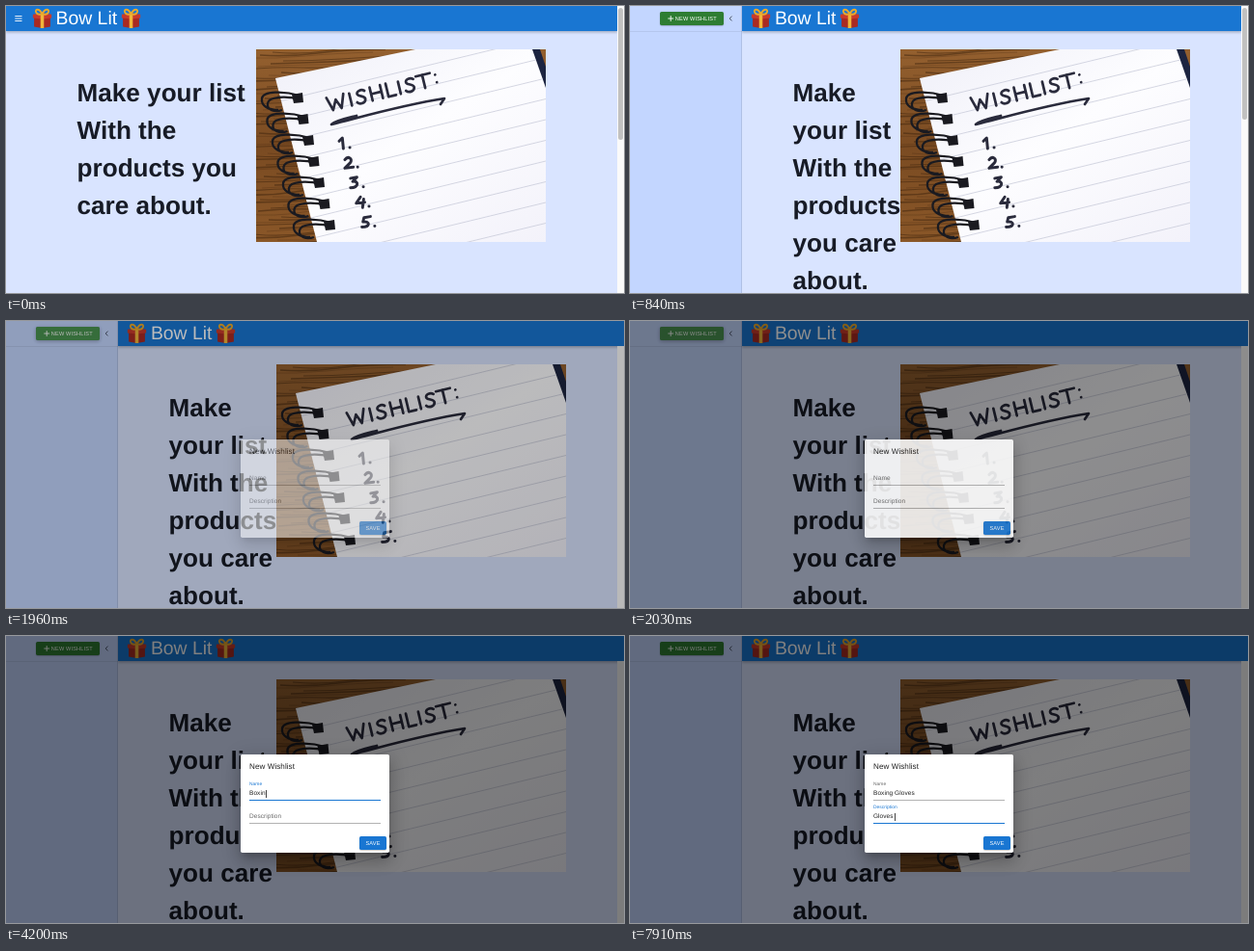
An HTML page for the animation above (8 s loop, 640x298 px).

```html
<!DOCTYPE html>
<html lang="en">
<head>
<meta charset="utf-8">
<title>Wishlist</title>
<style>
html, body { margin: 0; width: 100%; height: 100%; overflow: hidden; }
body { position: relative; background: #fff; font-family: "Liberation Sans", Arial, sans-serif; text-rendering: geometricPrecision; }
div, svg, label, button { position: absolute; box-sizing: border-box; }
#stage { width: 640px; height: 298px; overflow: hidden; background: #d9e4ff; }
#heading { top: 71px; font: bold 26.1px/39px "Liberation Sans", Arial, sans-serif; color: #171b26; }
#photo { top: 44.5px; width: 300px; height: 200px; }
#bar { top: 0; height: 26px; background: #1976d2;
  box-shadow: 0 .8px 1.6px -.4px rgba(0,0,0,.2), 0 1.6px 2px rgba(0,0,0,.14), 0 .4px 4px rgba(0,0,0,.12); }
#brand { top: 0; height: 26px; width: 120px; color: #fff; font-size: 19.4px; line-height: 26px; white-space: pre; }
#brand span { position: absolute; left: 24px; }
#brand svg { top: 2px; left: -.5px; width: 21px; height: 21px; }
#menu { left: 0; top: 0; width: 26px; height: 26px; }
#track { left: 633px; width: 7px; height: 298px; background: #fafafa; }
#thumb { left: 1px; top: 2px; width: 5px; border-radius: 3px; background: #c1c1c1; }
#drawer { width: 116.4px; height: 298px; background: #c3d6ff; border-right: .5px solid rgba(0,0,0,.1); }
#drawer hr { position: absolute; margin: 0; top: 26px; width: 116px; border: 0; border-top: 1px solid rgba(0,0,0,.07); }
button { border: 0; padding: 0; color: #fff; border-radius: 1.7px; font: 5.6px/14px "Liberation Sans", Arial, sans-serif; letter-spacing: .16px;
  box-shadow: 0 .8px .8px rgba(0,0,0,.16), 0 .4px 2px rgba(0,0,0,.14); overflow: hidden; }
#add { left: 31px; top: 5.5px; width: 66px; height: 14.6px; background: #2e7d32; text-align: left; }
#add span { position: absolute; left: 15.8px; top: .3px; white-space: pre; }
#add svg { left: 0; top: .3px; width: 66px; height: 14px; overflow: visible; }
#shade { inset: 0; background: rgba(0,0,0,.5); }
#dialog { left: 243px; top: 123px; width: 154px; height: 102px; background: #fff; border-radius: 1.7px;
  box-shadow: 0 4.5px 6px -3px rgba(0,0,0,.2), 0 9.7px 15.4px 1.2px rgba(0,0,0,.14), 0 3.6px 18.7px 3.2px rgba(0,0,0,.12); }
#dialog h2 { position: absolute; left: 9px; top: 7px; margin: 0; font-size: 8.1px; line-height: 11px; font-weight: 400; letter-spacing: .06px; color: rgba(0,0,0,.87); }
#save { left: 123px; top: 85px; width: 28px; height: 14px; background: #1976d2; }
.field { left: 9px; width: 136px; height: 12px; font-size: 6.5px; line-height: 10px; letter-spacing: .06px; }
.field label { left: 0; top: 0; transform-origin: 0 50%; }
.field .text { white-space: pre; color: rgba(0,0,0,.87); }
.caret { position: absolute; right: -.8px; top: 1px; width: .8px; height: 8px; background: #444; }
.rule, .focus { left: 0; top: 11px; width: 136px; height: 1px; background: rgba(0,0,0,.3); }
.focus { background: #1976d2; }
</style>
</head>
<body>
<div id="stage">
  <div id="heading">Make your list With the products you care about.</div>
  <svg id="photo" viewBox="0 0 300 200">
    <defs>
      <linearGradient id="wood" x2="0" y2="1"><stop stop-color="#94602f"/><stop offset=".5" stop-color="#7a4b22"/><stop offset="1" stop-color="#8a5728"/></linearGradient>
      <linearGradient id="paper" x2="1" y2="1"><stop stop-color="#efeff8"/><stop offset=".5" stop-color="#fdfdff"/><stop offset="1" stop-color="#f3f2fa"/></linearGradient>
      <clipPath id="sheet"><path d="M20 30L165 0H286L300 40V200H63Z"/></clipPath>
    </defs>
    <path fill="url(#wood)" d="M0 0H300V200H0Z"/>
    <g id="grain" fill="none" stroke="#3d220d" stroke-opacity=".5"/>
    <path fill="#1c2440" d="M284 0H294L300 18V42Z"/>
    <g clip-path="url(#sheet)">
      <path fill="url(#paper)" d="M0 0H300V200H0Z"/>
      <g id="lines" stroke="#c3c6d6" stroke-width=".7"/>
    </g>
    <g id="rings" fill="none" stroke="#1a1a20" stroke-width="2.3"/>
    <g fill="none" stroke="#2a2b3c" stroke-width="2.7" stroke-linecap="round" stroke-linejoin="round">
      <g transform="translate(76 64) rotate(-13.5)">
        <path d="M0-14L4 0L9-10L13 0L18-14M24-13v13M46-14v14M57-14v14M46-7h11M63-14v14h8M76-13v13M95-14h15M102-14v14M115-11h.1M115-3h.1"/>
        <path id="ess" d="M40-12c-3-3-9-1-8 2s8 3 7 7s-7 4-9 1"/>
        <use href="#ess" x="52"/>
      </g>
      <path d="M104 69C92 72 82 74 78 78C110 70 150 58 195 51L191 57"/>
      <g id="digits"/>
    </g>
  </svg>
  <div id="bar">
    <svg id="menu" viewBox="0 0 26 26"><circle id="tap" cx="13" cy="13" fill="#fff"/><path stroke="#fff" stroke-width=".9" d="M9.3 10.5h7.2M9.3 13h7.2M9.3 15.5h7.2"/></svg>
    <div id="brand"><svg id="gift" viewBox="0 0 20 20">
      <path fill="#a92a22" d="M2 9H18V18.5L10 20L2 18.5Z"/><path fill="#c93a2b" d="M.8 6.5L10 5L19.2 6.5V10L10 11L.8 10Z"/>
      <path fill="#f0b63a" d="M8.3 5.5h3.4V20H8.3Z"/><path fill="none" stroke="#e9a92c" stroke-width="1.8" d="M10 6C7 0 2.5 1 4 4.5S8 6 10 6C13 0 17.5 1 16 4.5S12 6 10 6Z"/>
    </svg><span>Bow Lit</span></div>
  </div>
  <div id="track"><div id="thumb"></div></div>
  <div id="drawer">
    <hr>
    <button id="add"><svg viewBox="0 0 66 14"><circle id="ripple" cx="46" cy="8" fill="#8fe09a"/><path stroke="#fff" stroke-width=".9" d="M8.3 7h5.8M11.2 4.1v5.8"/></svg><span>NEW WISHLIST</span></button>
    <svg style="left:100px;top:8px" width="10" height="10"><path fill="none" stroke="#4c556b" d="M5.5 2.6L3.2 5L5.5 7.4"/></svg>
  </div>
  <div id="shade"></div>
  <div id="dialog">
    <h2>New Wishlist</h2>
    <div class="field" style="top:36px"></div>
    <div class="field" style="top:60px"></div>
    <button id="save">SAVE</button>
  </div>
</div>
<script>
const $ = id => document.getElementById(id);
const LOOP = 8000, STEP = 70;

const clamp = v => Math.min(1, Math.max(0, v));
const lerp = (a, b, p) => a + (b - a) * p;
const span = (t, from, length) => clamp((t - from) / length);

// Deceleration curve: cubic-bezier(0, 0, .2, 1)
function easeOut(u) {
  let lo = 0, hi = 1;
  for (let i = 0; i < 20; i++) {
    const s = (lo + hi) / 2;
    if (.6 * (1 - s) * s * s + s * s * s < u) lo = s; else hi = s;
  }
  return 3 * lo * lo - 2 * lo * lo * lo;
}

function track(keys, t) {
  const i = keys.findIndex(k => k[0] > t);
  if (i === 0) return keys[0][1];
  if (i < 0) return keys[keys.length - 1][1];
  const [a, b] = [keys[i - 1], keys[i]];
  return lerp(a[1], b[1], (t - a[0]) / (b[0] - a[0]));
}

function drawPhoto() {
  let grain = '', lines = '', rings = '', digits = '';
  for (let i = 0; i < 70; i++) {
    const y = i * 3, x = (i * 37) % 50 - 20, bend = (i * 13) % 7 - 3;
    grain += `<path stroke-width="${.5 + i % 3 * .6}" d="M${x} ${y}q30 ${bend} 60 -2t70 -4"/>`;
  }
  for (let i = 0; i < 12; i++) {
    const y = 55 + i * 21.5;
    lines += `<path d="M20 ${y}L300 ${y - 68}"/>`;
  }
  for (let i = 0; i < 7; i++) {
    rings += `<g transform="translate(${49 + i * 5.5} ${51 + i * 22})">
      <path d="M-4-3C-20-8-42-8-43 0S-36 12-26 12M-4 1C-18-3-36-2-37 5S-30 15-22 12"/>
      <path fill="#1a1a20" stroke="none" d="M-12-4L-1-6L0 4L-10 5Z"/></g>`;
  }
  ['M0-7l3-3l1 10', 'M0-8c3-4 8-1 5 3l-5 5l8-1', 'M0-9l6-1l-4 4c6-1 6 6-2 6',
   'M4-10l-4 6l8-1M7-8l-1 8', 'M8-10l-6 1l-1 4c7-1 7 5-1 5'].forEach((d, i) => {
    digits += `<path transform="translate(${86 + i * 5.9} ${103 + i * 20.4}) scale(1.1)" d="${d}M${i ? 12 : 10}-1h.1"/>`;
  });
  $('grain').innerHTML = grain;
  $('lines').innerHTML = lines;
  $('rings').innerHTML = rings;
  $('digits').innerHTML = digits;
}

const gift = $('gift').cloneNode(true);
gift.removeAttribute('id');
gift.style.left = '91.5px';
$('brand').append(gift);
drawPhoto();

function makeField(el, name, value, times, focusAt, blurAt) {
  el.innerHTML = `<label>${name}</label><div class="text"><span></span><i class="caret"></i></div>
    <div class="rule"></div><div class="focus"></div>`;
  const [label, text, , line] = el.children;
  const [typed, caret] = text.children;
  return t => {
    const on = easeOut(span(t, focusAt, 200)), off = easeOut(span(t, blurAt, 200));
    const focused = t >= focusAt && t < blurAt;
    const blink = t >= 6580 && t < 7140;
    label.style.transform = `translateY(${-9.5 * on}px) scale(${1 - .25 * on})`;
    label.style.color = focused ? '#1976d2' : 'rgba(0,0,0,.6)';
    line.style.transform = `scaleX(${on - off})`;
    typed.textContent = value.slice(0, times.filter(at => at <= t).length);
    caret.style.display = focused && !blink ? '' : 'none';
  };
}

const [nameBox, infoBox] = document.querySelectorAll('.field');
const fields = [
  makeField(nameBox, 'Name', 'Boxing Gloves',
    [3570, 3640, 3710, 4060, 4130, 4270, 4410, 4620, 4760, 4970, 5180, 5250, 5670], 2895, 6042),
  makeField(infoBox, 'Description', 'Gloves ', [7140, 7350, 7490, 7630, 7630, 7770, 7910], 6042, LOOP)
];

const OPEN = 350;
const FADE = [[1610, 0], [1750, .05], [1890, .22], [1960, .52], [2030, .88], [2170, 1]];

function render(t) {
  const open = t >= OPEN, p = easeOut(span(t, OPEN, 420));
  const textX = lerp(73.6, 168.6, p), photoX = lerp(259, 280, p), edge = 116.4 * p;
  const fade = track(FADE, t), modal = fade > 0;

  $('heading').style.left = textX + 'px';
  $('heading').style.width = photoX - textX + 1 + 'px';
  $('photo').style.left = photoX + 'px';
  $('drawer').style.transform = `translateX(${117 * (p - 1)}px)`;
  $('bar').style.left = edge + 'px';
  $('bar').style.width = (modal ? 640 : 633) - edge + 'px';
  $('brand').style.left = (open ? 9.5 : 27.5) + 'px';
  $('menu').style.display = open ? 'none' : '';
  $('thumb').style.display = modal ? 'none' : '';
  $('thumb').style.height = lerp(137, 116, p) + 'px';
  $('track').style.top = modal ? '26px' : 0;

  const tap = span(t, 0, 280);
  $('tap').setAttribute('r', 9 * tap);
  $('tap').setAttribute('opacity', .22 * Math.min(1, tap * 4));

  const hover = span(t, 840, 280) * (1 - span(t, 2170, 280));
  const lift = 1 + hover;
  $('add').style.background = `rgb(${lerp(46, 27, hover)},${lerp(125, 94, hover)},${lerp(50, 32, hover)})`;
  $('add').style.boxShadow = `0 ${.8 * lift}px ${.8 + 3 * hover}px rgba(0,0,0,.16), 0 .4px ${2 * lift}px rgba(0,0,0,.14)`;
  $('ripple').setAttribute('r', 52 * easeOut(span(t, 1540, 560)));
  $('ripple').setAttribute('opacity', .4 * (1 - span(t, 2030, 420)));

  $('shade').style.opacity = $('dialog').style.opacity = fade;
  fields.forEach(draw => draw(t));
}

function tick() {
  const t = performance.now() % LOOP;
  render(Math.min(7910, Math.floor(t / STEP) * STEP));
  requestAnimationFrame(tick);
}
tick();
</script>
</body>
</html>
```
